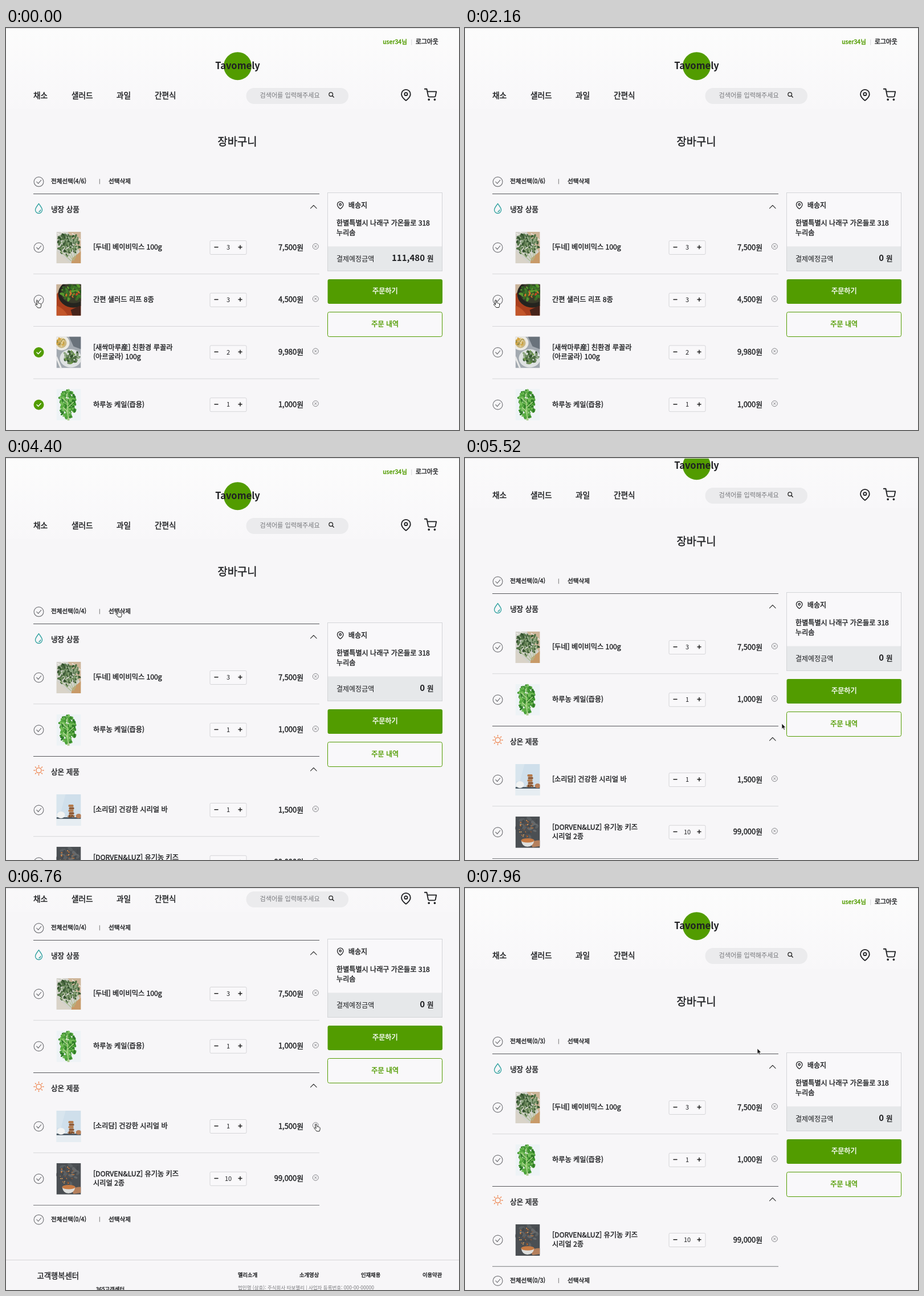
Write an HTML page that moves like this. It is 795 px wide and 704 px high and loops after 8000 ms.

```html
<!DOCTYPE html>
<html lang="ko">
<head>
<meta charset="utf-8">
<title>장바구니</title>
<style>
html, body { margin: 0; width: 100%; height: 100%; overflow: hidden; background: #f7f6f8; }
#stage { display: block; width: 795px; height: 704px; }
text { font-family: "Noto Sans CJK KR", "Noto Sans CJK JP", "Noto Sans CJK", "Noto Sans", sans-serif; fill: #1f2023; white-space: pre; }
.m { stroke: currentColor; stroke-width: .42px; color: #1f2023; }
.b { font-weight: 700; }
.gray { fill: #77787c; }
.green { fill: #529c00; color: #529c00; }
.white { fill: #fff; color: #fff; }
.end { text-anchor: end; }
.mid { text-anchor: middle; }
.icon { fill: none; stroke: #1f2023; stroke-linecap: round; stroke-linejoin: round; }
</style>
</head>
<body>
<svg id="stage" viewBox="0 0 795 704">
  <defs>
    <linearGradient id="fade" x2="0" y2="1">
      <stop stop-color="#fcfcfc"/><stop offset="1" stop-color="#f8f7f9"/>
    </linearGradient>
  </defs>
  <rect width="795" height="704" fill="#f7f6f8"/>
  <g id="page"></g>
  <g id="header"></g>
  <rect width="795" height="1" fill="#d9d9db"/>
  <path id="cursor" stroke-linejoin="round"/>
</svg>
<script>
const LOOP = 8000, GREEN = '#529c00', HEADER_TRAVEL = 99, ROW = 91.75, SECTION_HEAD = 48.5;
const $ = id => document.getElementById(id);

const text = (x, y, size, str, cls = '') =>
  `<text x="${x}" y="${y}" font-size="${size}" class="${cls}">${str}</text>`;
const rect = (x, y, w, h, fill, extra = '') =>
  `<rect x="${x}" y="${y}" width="${w}" height="${h}" fill="${fill}" ${extra}/>`;
const oval = (x, y, rx, ry, fill, turn = 0) =>
  `<ellipse cx="${x}" cy="${y}" rx="${rx}" ry="${ry}" fill="${fill}" transform="rotate(${turn} ${x} ${y})"/>`;
const shape = (d, fill) => `<path d="${d}" fill="${fill}"/>`;
const line = (d, color, width = 1) =>
  `<path d="${d}" fill="none" stroke="${color}" stroke-width="${width}" stroke-linecap="round" stroke-linejoin="round"/>`;
const rule = (y, color, x1 = 48, x2 = 550) => rect(x1, y - .5, x2 - x1, 1, color);

// Seeded cloud of small ovals, used for leaves and crumbs.
function scatter(seed, count, cx, cy, rx, ry, size, colors) {
  const rnd = () => (seed = (seed * 16807) % 2147483647) / 2147483647;
  let out = '';
  for (let i = 0; i < count; i++) {
    const a = rnd() * 6.283, r = Math.sqrt(rnd()), s = size * (.6 + rnd() * .7);
    out += oval((cx + Math.cos(a) * r * rx).toFixed(1), (cy + Math.sin(a) * r * ry).toFixed(1),
      s.toFixed(1), (s * .55).toFixed(1), colors[i % colors.length], Math.round(rnd() * 180));
  }
  return out;
}

const LEAF = ['#48653f', '#6c8a5c', '#34522f', '#8fa883', '#527446'];
const BRIGHT = ['#3f9430', '#58ab42', '#2f7d28', '#74bd59'];
const thumbs = {
  mix: rect(0, 0, 43, 55, '#d3d2cc') + shape('M20 0H43V40L34 22Z', '#cdb599') +
    shape('M0 34L24 55H0Z', '#d9d3c8') + shape('M28 46L43 34V55H26Z', '#c89a68') +
    line('M2 3L14 10M8 0L22 8M28 3L42 14', '#f0eee8', 1.5) +
    scatter(7, 95, 14, 24, 14, 20, 2.8, LEAF) + scatter(31, 70, 29, 21, 12, 16, 2.6, LEAF) +
    line('M12 24L28 49M20 20L30 50M32 22L31 49M7 34L26 51M38 24L33 46', '#a9bd8e', 1.1),
  salad: rect(0, 0, 43, 55, '#a93f1d') + shape('M0 0H14L0 18Z', '#c9b49a') +
    oval(30, 17, 27, 24, '#25241f') + oval(30, 15, 22, 18, '#3a3b2a') +
    scatter(11, 60, 28, 14, 19, 14, 3.5, ['#3c7a28', '#58992f', '#2a5522', '#3e6a25']) +
    scatter(5, 9, 27, 14, 15, 10, 2.2, ['#d4752c', '#c14a22']) +
    shape('M0 37Q14 43 20 55H0Z', '#c25529') + shape('M25 45L43 37V55H28Z', '#46231a'),
  rocket: rect(0, 0, 43, 55, '#a2a9b0') + shape('M22 0H43V22L30 17Z', '#69727b') +
    oval(9, 11, 14, 13, '#eceae4') + oval(9, 11, 9, 9, '#cdb87f') +
    scatter(9, 18, 8, 10, 8, 7, 2.5, ['#d6a742', '#e5d39a', '#9b8a43']) +
    oval(25, 38, 19, 16, '#dfe2e2') + scatter(15, 65, 26, 36, 14, 11, 3, LEAF.concat('#6d9a43')) +
    line('M0 36L8 55', '#e9e9e8', 3),
  kale: rect(0, 0, 43, 55, '#eef3f6') + line('M20 34L21 54', '#a6c987', 4) +
    scatter(3, 120, 20, 20, 14, 18, 3.4, BRIGHT) + scatter(21, 60, 21, 38, 13, 13, 3.2, BRIGHT) +
    line('M19 7Q18 28 21 53M19 24L11 16M19 33L30 23M20 40L12 32', '#b5d894', 1.3),
  bar: rect(0, 0, 43, 55, '#cfdfeb') + shape('M0 0H16L8 30H0Z', '#d8e5ee') +
    rect(0, 39, 43, 16, '#e6edf2') + rect(0, 40, 43, 3, '#505e69') +
    oval(8, 36, 7, 6, '#f2f3f2') + oval(39, 38, 5, 4, '#b77f58') +
    [0, 1, 2, 3, 4].map(i => rect(21 + i % 2, 18 + i * 4.4, 9, 4, i % 2 ? '#8e5a36' : '#b57a4a', 'rx="1.5"')).join('') +
    scatter(8, 10, 26, 38, 9, 2, 1.8, ['#9a6439', '#714526']),
  kids: rect(0, 0, 43, 55, '#4b4f53') + scatter(6, 30, 20, 18, 20, 20, 4, ['#5b6063', '#45494d', '#66696b']) +
    scatter(13, 28, 19, 20, 13, 17, 1.3, ['#c8783b', '#92552f', '#dca05d']) +
    shape('M26 46Q36 41 43 42V52L30 54Z', '#b5805d') +
    shape('M10 42H33Q31 53 21 53Q12 53 10 42Z', '#dedfdd') + oval(21.5, 42, 11.5, 3.8, '#c77a43')
};

const items = [
  { sec: 0, art: 'mix', name: ['[두네] 베이비믹스 100g'], qty: 3, price: 7500 },
  { sec: 0, art: 'salad', name: ['간편 샐러드 리프 8종'], qty: 3, price: 4500 },
  { sec: 0, art: 'rocket', name: ['[새싹마루産] 친환경 루꼴라', '(아르굴라) 100g'], qty: 2, price: 9980 },
  { sec: 0, art: 'kale', name: ['하루농 케일(즙용)'], qty: 1, price: 1000 },
  { sec: 1, art: 'bar', name: ['[소리담] 건강한 시리얼 바'], qty: 1, price: 1500 },
  { sec: 1, art: 'kids', name: ['[DORVEN&amp;LUZ] 유기농 키즈', '시리얼 2종'], qty: 10, price: 99000 }
];
const sections = ['냉장 상품', '상온 제품'];

// Cart history: [time, item indices in cart, selected indices]
const ALL = [0, 1, 2, 3, 4, 5];
const states = [
  [0, ALL, [2, 3, 4, 5]], [720, ALL, ALL], [1240, ALL, []], [2360, ALL, [1]],
  [2800, ALL, [1, 2]], [4280, [0, 3, 4, 5], []], [6900, [0, 3, 5], []]
];
// [time, offset]
const scrolls = [[0, 0], [4760, 0], [5400, 53], [5680, 53], [6160, 81], [6300, 81], [6720, 199], [7620, 199], [7920, 0]];
// [time, x, y, shape used from this time on]
const moves = [
  [0, 50.5, 477, 'hand'], [160, 50.5, 477, 'arrow'], [560, 53, 264, 'hand'], [1480, 53, 264, 'arrow'],
  [1960, 49.5, 476.5, 'hand'], [2440, 49.5, 476.5, 'hand'], [2680, 52.5, 566, 'hand'], [3400, 52.5, 566, 'arrow'],
  [3960, 192, 265.5, 'hand'], [4520, 192, 265.5, 'arrow'], [5000, 556, 465, 'arrow'], [5720, 556, 465, 'arrow'],
  [6160, 542, 545, 'arrow'], [6300, 542, 545, 'arrow'], [6700, 540, 413, 'hand'], [6980, 540, 413, 'arrow'],
  [7300, 482, 445, 'arrow'], [7560, 482, 445, 'arrow'], [7880, 513, 281, 'arrow']
];
const pointers = {
  arrow: 'M0 0V9.6L2.2 7.6 3.8 11.2 5.4 10.5 3.9 7H6.8Z',
  hand: 'M4.3 8L3 2Q2.8 .4 4 .3Q5 .3 5.3 1.6L6.1 5Q7.2 4.4 7.9 5.3Q9.1 4.9 9.6 6Q11 5.8 11.2 7.5Q11.4 10 10 13H5.2Q4 11 1.2 8.4Q.5 7.2 1.7 6.9Q2.8 6.8 4.3 8Z'
};

const check = (y, on) => on
  ? `<circle cx="57.5" cy="${y}" r="9" fill="${GREEN}"/>` + line(`M54 ${y}l2.6 2.8l4.6 -5`, '#fff', 1.4)
  : `<circle cx="57.5" cy="${y}" r="8.4" fill="none" stroke="#78797d" stroke-width="1.2"/>` +
    line(`M53.8 ${y}l2.8 3l5 -5.8`, '#78797d', 1.2);

const pin = (cx, cy, scale, width) =>
  `<g class="icon" transform="translate(${cx} ${cy}) scale(${scale}) translate(-12 -12)" stroke-width="${width}">
   <path d="M21 10c0 7-9 13-9 13s-9-6-9-13a9 9 0 0 1 18 0z"/><circle cx="12" cy="10" r="3"/></g>`;

const selectBar = (y, picked, total) => check(y + .5, picked === total) +
  text(79, y + 3.6, 10.6, `전체선택(${picked}/${total})`, 'm') +
  rect(163.8, y - 4.5, 1, 9, '#777') + text(180, y + 3.6, 10.6, '선택삭제', 'm');

function sectionIcon(index, y) {
  if (!index) return `<g transform="translate(57.5 ${y + 17})">` +
    line('M0 0C-2.5 4 -6 7.5 -6 11A6 6 0 0 0 6 11C6 7.5 2.5 4 0 0ZM3.2 11Q3 13.5 .5 14', '#2b9f9d', 1.3) + '</g>';
  const ray = a => `<path d="M0 -6.8V-8.6" transform="rotate(${a})"/>`;
  return `<g transform="translate(57.5 ${y + 24.5})" fill="none" stroke="#ee8a58" stroke-width="1.4" stroke-linecap="round">
    <circle r="4.5"/>${[0, 45, 90, 135, 180, 225, 270, 315].map(ray).join('')}</g>`;
}

const sectionHead = (index, y) => rule(y, '#55565a') + sectionIcon(index, y) +
  text(79, y + 31.6, 12.6, sections[index], 'm') + line(`M534.5 ${y + 25.3}l5.3 -5.3l5.3 5.3`, '#333', 1.1);

function itemRow(item, y, on) {
  const names = item.name.map((s, i) =>
    text(153, y + 3.9 + (item.name.length - 1) * -8.2 + i * 16.2, 12.2, s, 'm')).join('');
  return check(y, on) +
    `<svg x="88.5" y="${y - 27.5}" width="43" height="55">${thumbs[item.art]}</svg>` + names +
    rect(358, y - 12, 64, 24, '#f9f8fa', 'rx="2" stroke="#d5d5d8"') +
    line(`M366 ${y - .8}h6M408 ${y - .8}h6M411 ${y - 3.8}v6`, '#222', 1.5) +
    text(390, y + 3.5, 11, item.qty, 'mid') +
    text(522, y + 4, 12.9, item.price.toLocaleString('en-US') + '원', 'm end') +
    `<circle cx="543.3" cy="${y - 2}" r="5" fill="none" stroke="#77787c" stroke-width=".9"/>` +
    line(`M541.5 ${y - 3.8}l3.6 3.6m0 -3.6l-3.6 3.6`, '#77787c', .9);
}

function orderPanel(total) {
  return rect(564.5, 288.5, 201, 137, '#f9f8fa', 'stroke="#d3d5d8"') +
    rect(565, 382.5, 200, 42.5, '#e6e8ea') + pin(586.7, 310.4, .58, 2.2) +
    text(601, 315, 12, '배송지', 'm') +
    text(580, 346.3, 12.1, '한별특별시 나래구 가온들로 318', 'm') + text(580, 363.3, 12.1, '누리솜', 'm') +
    text(580, 408.7, 12, '결제예정금액') +
    text(735, 408.4, 15, total.toLocaleString('en-US'), 'b end') + text(739, 407.8, 12.6, '원', 'm') +
    rect(564.5, 440, 201.5, 43, GREEN, 'rx="3"') + text(665.3, 465.3, 12.1, '주문하기', 'm mid white') +
    rect(564.5, 497.5, 201, 43, '#f9f8fa', `rx="3" stroke="${GREEN}"`) +
    text(665.3, 522.8, 12.1, '주문 내역', 'm mid green');
}

function footer(y) {
  const links = ['멜리소개', '소개영상', '인재채용', '이용약관'];
  const hours = dy => text(158, y + dy, 9.4, '365고객센터', 'm') + text(158, y + dy + 15.7, 9.6, '오전 7시 - 오후 7시', 'gray');
  return rule(y, '#d5d5d8', 0, 795) + text(54.5, y + 32.2, 13.3, '고객행복센터', 'm') +
    text(47.5, y + 67.8, 18.4, '0000-0000', 'm') + hours(54.7) + hours(97.3) +
    rect(48, y + 93, 99, 25, 'none', 'rx="3" stroke="#55565a"') + text(97.5, y + 108.6, 9.6, '나누리톡 문의', 'm mid') +
    links.map((s, i) => text(407 + i * 108, y + 29.4, 9.3, s, 'm')).join('') +
    text(407, y + 51.6, 8.5, '법인명 (상호): 주식회사 타보멜리 | 사업자 등록번호: 000-00-00000', 'gray') +
    text(407, y + 64.6, 8.5, '주소: 한별특별시 나래구 가온들로 | 제휴문의: <tspan class="green">hello@tavomely.example</tspan>', 'gray') +
    text(407, y + 86.6, 8.5, 'TAVOMELY CORP.ALL RIGHT RESERVED', 'gray');
}

function pageView([, cart, selected]) {
  let y = 290.5, out = text(406, 205.6, 18.8, '장바구니', 'm mid') + selectBar(268.8, selected.length, cart.length);
  sections.forEach((_, s) => {
    const rows = cart.filter(i => items[i].sec === s);
    out += sectionHead(s, y);
    rows.forEach((i, n) => {
      out += itemRow(items[i], y + 94 + n * ROW, selected.includes(i));
      if (n) out += rule(y + SECTION_HEAD + n * ROW, '#d6d6d9');
    });
    y += SECTION_HEAD + rows.length * ROW;
  });
  const total = selected.reduce((sum, i) => sum + items[i].price, 0);
  return out + rule(y, '#77787c') + selectBar(y + 24.7, selected.length, cart.length) +
    footer(y + 96) + orderPanel(total);
}

function headerView() {
  const nav = [[48, '채소'], [115, '샐러드'], [194, '과일'], [261, '간편식']];
  return rect(0, 0, 795, 141, 'url(#fade)') +
    text(704, 28, 10.6, 'user34님', 'm end green') + rect(711.3, 20, 1, 10, '#d5d5d8') +
    text(719, 28, 10.8, '로그아웃', 'm') +
    `<circle cx="406.5" cy="66.7" r="24.5" fill="${GREEN}"/>` + text(406.5, 71.5, 16.5, 'Tavomely', 'b mid') +
    nav.map(([x, s]) => text(x, 122.7, 13.6, s, 'm')).join('') +
    rect(421.5, 105, 179.5, 28, '#ebebed', 'rx="14"') + text(445.5, 122, 11.1, '검색어를 입력해주세요', 'gray') +
    '<circle cx="570.2" cy="116.2" r="3.3" fill="none" stroke="#222" stroke-width="1.3"/>' +
    line('M572.8 118.8l2.4 2.4', '#222', 1.4) + pin(701.9, 117.4, .87, 2.1) +
    `<g class="icon" transform="translate(733.8 105.8) scale(.93)" stroke-width="2">
     <path d="M1 1h4l2.68 13.39a2 2 0 0 0 2 1.61h9.72a2 2 0 0 0 2-1.61L23 6H6"/><circle cx="9" cy="21" r="1"/><circle cx="20" cy="21" r="1"/></g>`;
}

const stepAt = (table, t) => table.findLastIndex(step => step[0] <= t);
const smooth = p => p * p * (3 - 2 * p);

function valueAt(table, t, column) {
  const i = stepAt(table, t), a = table[i], b = table[i + 1];
  return b ? a[column] + (b[column] - a[column]) * smooth((t - a[0]) / (b[0] - a[0])) : a[column];
}

let shown = -1;
function draw(t) {
  const current = stepAt(states, t);
  if (current !== shown) $('page').innerHTML = pageView(states[shown = current]);
  const scroll = Math.round(valueAt(scrolls, t, 1));
  $('page').setAttribute('transform', `translate(0 ${-scroll})`);
  $('header').setAttribute('transform', `translate(0 ${-Math.min(scroll, HEADER_TRAVEL)})`);
  const kind = moves[stepAt(moves, t)][3], arrow = kind === 'arrow', cursor = $('cursor');
  cursor.setAttribute('d', pointers[kind]);
  cursor.setAttribute('transform', `translate(${valueAt(moves, t, 1)} ${valueAt(moves, t, 2)})`);
  cursor.setAttribute('fill', arrow ? '#111' : '#fff');
  cursor.setAttribute('stroke', arrow ? '#fff' : '#222');
  cursor.setAttribute('stroke-width', arrow ? .7 : 1);
}

$('header').innerHTML = headerView();
const start = performance.now();
function tick() {
  draw((performance.now() - start) % LOOP);
  requestAnimationFrame(tick);
}
tick();
</script>
</body>
</html>
```
